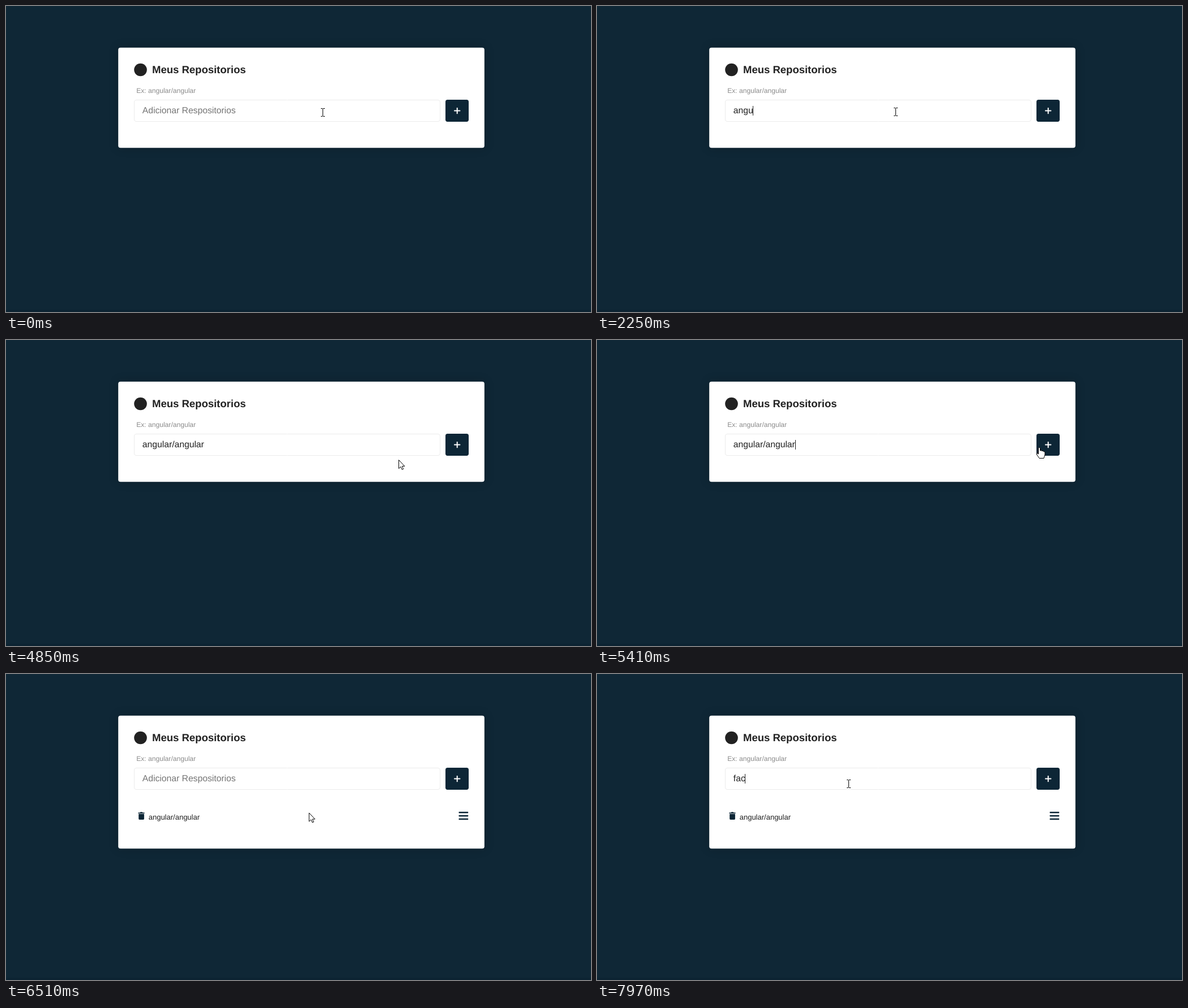
An HTML page with a canvas that plays this animation: 1033x542 px, repeating every 8 s.

```html
<!DOCTYPE html>
<html lang="pt-BR">
<head>
<meta charset="utf-8">
<title>Meus Repositorios</title>
<style>
  html, body { margin: 0; width: 100%; height: 100%; overflow: hidden; background: #0f2736; }
  canvas { display: block; }
</style>
</head>
<body>
<canvas id="stage" width="1033" height="542"></canvas>
<script>
const ctx = document.getElementById('stage').getContext('2d');
const LOOP = 8000, BLINK = 530, CLICK = 5610, LISTED = 6230;
const NAVY = '#0d2636', INK = '#222222';
const FONT = '"Liberation Sans", Arial, sans-serif';
const REPO = 'angular/angular';
const FIELD = { x: 226, y: 166, w: 541, h: 39 };
const BUTTON = { x: 776, y: 166, w: 41, h: 39 };

const FIRST = { text: REPO, focus: 510, start: 1570, pace: 176 };
const SECOND = { text: 'fac', focus: 7140, start: 7680, pace: 145 };

// Each move bends from the previous end towards `via` and stops at `to`.
const MOVES = [
  { start: 70, end: 70, via: [536, 167], to: [536, 167] },
  { start: 230, end: 580, via: [542, 184], to: [527.5, 187] },
  { start: 4570, end: 5340, via: [736, 236.5], to: [781, 190] },
  { start: CLICK, end: 6370, via: [791, 250], to: [610, 256], speedUp: true },
  { start: 6370, end: 7280, via: [418, 236], to: [444.5, 194] }
];

function pointerAt(t) {
  let from = [559, 188];
  for (const { start, end, via, to, speedUp } of MOVES) {
    if (t < start) break;
    if (t < end) {
      const p = (t - start) / (end - start);
      const u = speedUp ? p ** 1.5 : 1 - (1 - p) ** 1.5;
      return from.map((a, i) => (1 - u) ** 2 * a + 2 * u * (1 - u) * via[i] + u * u * to[i]);
    }
    from = to;
  }
  return from;
}

// Keys come in quick pairs: every second one is struck early.
function keyTime(entry, i) {
  return entry.start + i * entry.pace - (i % 2) * 70;
}

function typedAt(entry, t) {
  return [...entry.text].filter((_, i) => keyTime(entry, i) <= t).join('');
}

function caretOn(entry, typed, t) {
  if (t < entry.focus || (entry === FIRST && t >= CLICK)) return false;
  const last = typed ? keyTime(entry, typed.length - 1) : entry.focus;
  return Math.floor((t - last) / BLINK) % 2 === 0;
}

function inside(r, x, y) {
  return x >= r.x && x <= r.x + r.w && y >= r.y && y <= r.y + r.h;
}

function box(x, y, w, h, r, fill) {
  ctx.beginPath();
  ctx.roundRect(x, y, w, h, r);
  ctx.fillStyle = fill;
  ctx.fill();
}

function dot(x, y, r, fill) {
  ctx.beginPath();
  ctx.arc(x, y, r, 0, Math.PI * 2);
  ctx.fillStyle = fill;
  ctx.fill();
}

function label(text, x, y, size, color, weight = '') {
  ctx.font = `${weight} ${size}px ${FONT}`;
  ctx.fillStyle = color;
  ctx.fillText(text, x, y);
}

function outline(path, x, y) {
  ctx.save();
  ctx.translate(x, y);
  const shape = new Path2D(path);
  ctx.fillStyle = '#fff';
  ctx.fill(shape);
  ctx.strokeStyle = '#000';
  ctx.lineWidth = 1;
  ctx.lineJoin = 'round';
  ctx.stroke(shape);
  ctx.restore();
}

function drawCard(h) {
  ctx.save();
  ctx.shadowColor = 'rgba(0,0,0,0.2)';
  ctx.shadowBlur = 18;
  box(198.2, 73.7, 646.6, h, 4, '#fff');
  ctx.restore();
  dot(237.5, 113, 11.3, INK);
  label('Meus Repositorios', 258, 119, 18.5, INK, 'bold');
  label('Ex: ' + REPO, 230.2, 154, 12.1, '#8c8c8c');
}

function drawField(t) {
  ctx.beginPath();
  ctx.roundRect(FIELD.x + 0.5, FIELD.y + 0.5, FIELD.w - 1, FIELD.h - 1, 3.5);
  ctx.strokeStyle = '#ececec';
  ctx.lineWidth = 1;
  ctx.stroke();
  const entry = t < LISTED ? FIRST : SECOND;
  const typed = typedAt(entry, t);
  label(typed || 'Adicionar Respositorios', 240.8, 190, 15.7, typed ? INK : '#757575');
  if (caretOn(entry, typed, t)) {
    ctx.fillStyle = INK;
    ctx.fillRect(Math.floor(241 + ctx.measureText(typed).width), 177, 1, 17);
  }
}

// Ring of eight places with one left empty.
function drawSpinner(t) {
  const turn = (t - 5950) / 2000 * Math.PI * 2;
  for (let i = 1; i < 8; i++) {
    const a = turn + i * Math.PI / 4;
    dot(796.5 + 5.4 * Math.cos(a), 185.5 + 5.4 * Math.sin(a), 1.25, '#fff');
  }
}

function drawButton(t) {
  const busy = t >= CLICK && t < LISTED;
  box(BUTTON.x, BUTTON.y, BUTTON.w, BUTTON.h, 3.7, busy ? '#86939b' : NAVY);
  if (busy) return drawSpinner(t);
  box(791, 184.6, 11.4, 2, 0.8, '#fff');
  box(795.7, 179.9, 2, 11.4, 0.8, '#fff');
}

function drawRow() {
  box(233.3, 245.4, 11.4, 1.7, 0.5, NAVY);
  box(236.8, 244.6, 4.4, 1.6, 0.6, NAVY);
  box(234.2, 247.7, 9.7, 10.3, [0, 0, 1.4, 1.4], NAVY);
  label(REPO, 251.7, 257.6, 13, INK);
  for (let i = 0; i < 3; i++) box(799.5, 244 + i * 5.9, 16.7, 2.5, 0.7, NAVY);
}

function drawBeam(x, y) {
  x = Math.round(x - 0.5);
  y = Math.round(y);
  ctx.fillStyle = '#000';
  ctx.fillRect(x, y - 6, 1, 13);
  for (const edge of [-7, 7]) {
    ctx.fillRect(x - 3, y + edge, 3, 1);
    ctx.fillRect(x + 1, y + edge, 3, 1);
  }
}

function drawPointer(t) {
  const [x, y] = pointerAt(t);
  if (inside(FIELD, x, y)) drawBeam(x, y);
  else if (inside(BUTTON, x, y)) {
    outline('M-1.5 12V1.5Q0-.8 1.5 1.5V6Q3.5 5 4.5 6.6Q6.5 5.8 7.3 7.4Q9.7 7 10 9.2V13L8 19.5H0L-5 12Q-4.5 9.5-1.5 12Z', x, y);
  } else {
    outline('M.5.5V15.7L4 12.5L6.3 17.6L8.6 16.6L6.4 11.6H10.9Z', x - 0.5, y - 0.5);
  }
}

function draw(t) {
  ctx.fillStyle = '#0f2736';
  ctx.fillRect(0, 0, 1033, 542);
  ctx.fillStyle = '#0c2332';
  ctx.fillRect(0, 538, 1033, 4);
  const listed = t >= LISTED;
  drawCard(listed ? 235.6 : 177.6);
  drawField(t);
  drawButton(t);
  if (listed) drawRow();
  drawPointer(t);
}

ctx.textRendering = 'geometricPrecision';
const begin = performance.now();
function tick() {
  draw((performance.now() - begin) % LOOP);
  requestAnimationFrame(tick);
}
tick();
</script>
</body>
</html>
```
